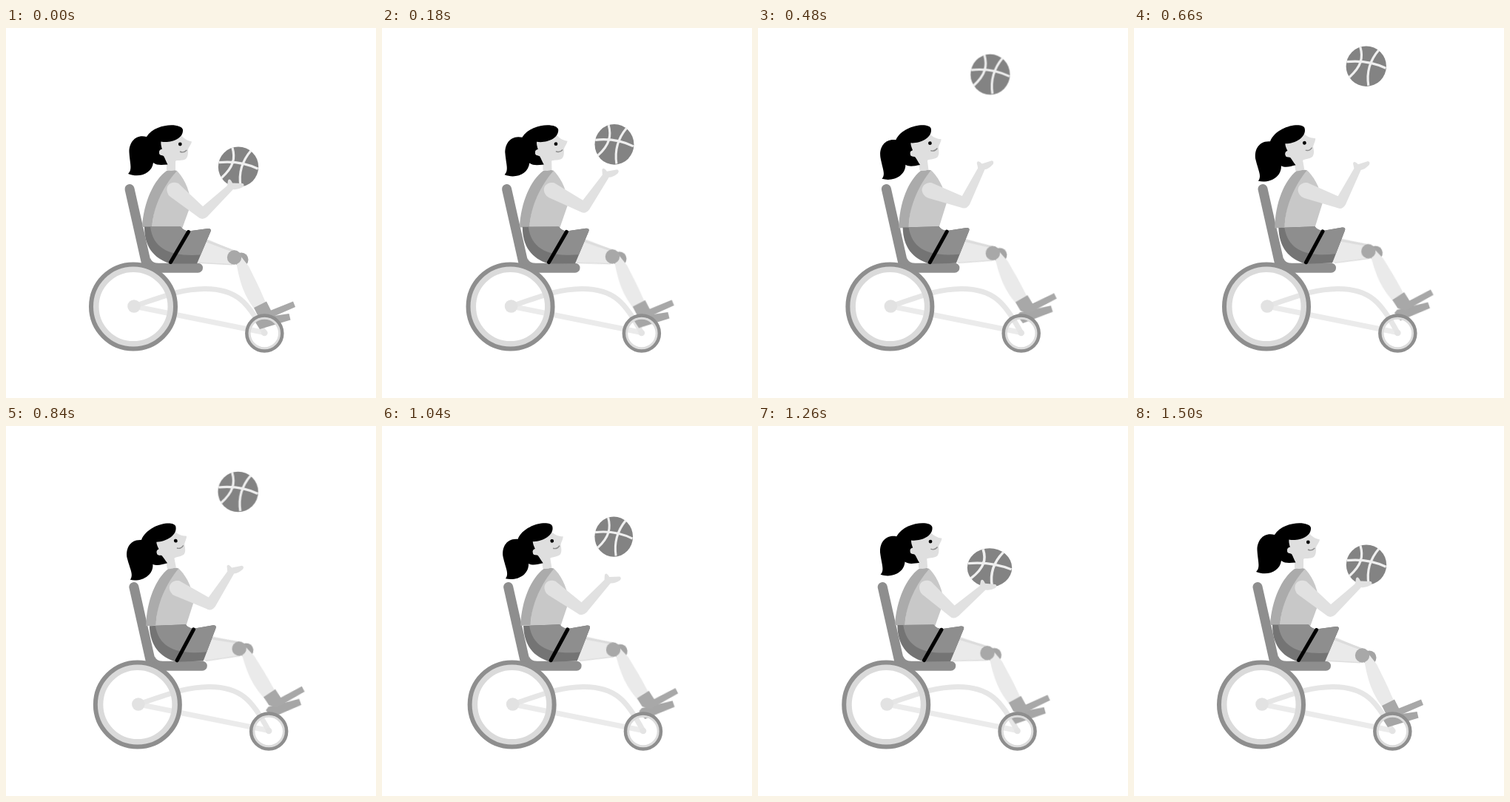
These frames come from a looping animation (500 by 500 pixels, 1.52 s). An HTML page:

```html
<!DOCTYPE html>
<html lang="en">
<head>
<meta charset="utf-8">
<title>Wheelchair basketball</title>
<style>
  html, body { margin: 0; width: 100%; height: 100%; overflow: hidden; background: #fff; }
  svg { display: block; width: 100vw; height: 100vh; }

  g[class] {
    animation-duration: 1520ms;
    animation-iteration-count: infinite;
    animation-timing-function: cubic-bezier(.333, 0, .667, 1);
  }
  .chair  { animation-name: roll; }
  .shorts { --x: 9px; --r: -2.2deg; transform-origin: 230px 285px; animation-name: slide, tilt; }
  .torso  { --x: 6.3px; --a: -2.6deg; transform-origin: 215px 269px; animation-name: slide; }
  .head   { --x: 1.8px; --r: -11deg; transform-origin: 222px 195px; animation-name: slide, tilt; }
  .thigh  { --x: 8.6px; --r: -11.5deg; transform-origin: 262px 302px; animation-name: slide, tilt; }
  .shin   { --x: 9.2px; --r: -5.5deg; --y: -9.3px; transform-origin: 310px 311px; animation-name: slide, tilt, lift; }
  .foot   { --r: -1deg; transform-origin: 344px 376px; animation-name: tilt; }
  .reach  { --x: 3.8px; animation-name: slide; }
  .arm    { transform-origin: 229px 217px; animation-name: throw; }
  .flight { animation-name: fly; }
  .ball   { animation-name: squash; }

  @keyframes roll {
    0%, 98.68%, 100% { translate: 0 0; }
    39.47% { translate: 7.1px 0; }
  }
  @keyframes slide {
    0%, 98.68%, 100% { translate: 0 0; rotate: 0deg; }
    31.58%, 39.47% { translate: var(--x) 0; rotate: var(--a, 0deg); }
  }
  @keyframes tilt {
    0%, 98.68%, 100% { rotate: 0deg; }
    53.95%, 59.21% { rotate: var(--r); }
  }
  @keyframes lift {
    0%, 98.68%, 100% { transform: translateY(0); }
    53.95%, 59.21% { transform: translateY(var(--y)); }
  }
  @keyframes throw {
    0%, 98.68%, 100% { rotate: 0deg; }
    21.05%, 39.47% { rotate: -20deg; }
    84.87% { rotate: 2.6deg; }
  }
  @keyframes fly {
    0%, 98.68%, 100% { translate: 314px 187.7px; }
    39.47% { translate: 313.8px 48.5px; }
    84.87% { translate: 313px 192.3px; }
  }
  @keyframes squash {
    0%, 39.47%, 55.26%, 98.68%, 100% { scale: 1 1; }
    22.37% { scale: .95 1.01; }
    68.42%, 75% { scale: .95 1; }
    82.89% { scale: 1.11 .965; }
  }
</style>
</head>
<body>
<svg viewBox="0 0 500 500" fill="none">
  <g class="chair">
    <g stroke-width="7" stroke-linecap="round">
      <path stroke="#ebebeb" d="M173 376 L349 411.5"/>
      <path stroke="#e6e6e6" d="M173 376 C215 362 235 353 268 352.5 C312 352 328 372 349 411.5"/>
    </g>
    <path d="M167 217.5 L191 324.2 H259.5" stroke="#8e8e8e" stroke-width="13" stroke-linecap="round" stroke-linejoin="round"/>
    <path d="M195 311 Q197.500 318 206 318 L194 320Z" fill="#8e8e8e"/>
  </g>

  <g class="shin"><circle cx="318" cy="313" r="9.5" fill="#a4a4a4"/></g>
  <g class="thigh">
    <path d="M258 288 L274 286 L308 301 V320 L258 317Z" fill="#eaeaea"/>
    <path d="M270 287.500 L310 302.500" stroke="#dcdcdc" stroke-width="3"/>
    <path d="M260 317.200 L306 319.700" stroke="#dedede" stroke-width="1.5"/>
  </g>
  <g class="shin">
    <path d="M311 316 C316 345 322 362 336 380 L352 374 C346 358 336 338 328 322 L317 308Z" fill="#eaeaea"/>
    <g class="foot">
      <path d="M340 392 L362 389 L382.500 386 L384.500 394.500 L343 407 L336 396Z" fill="#a6a6a6"/>
      <path d="M335 378 L352 369.5 L358 381.5 L388 369.5 L391 377 L352 394 L341 390Z" fill="#a8a8a8"/>
    </g>
    <circle cx="308.500" cy="310" r="9.700" fill="#a8a8a8"/>
  </g>

  <g class="torso">
    <path d="M229 194 C212 212 198 240 197.5 271 H238 L250 238 C248 215 238 200 231 193Z" fill="#c8c8c8"/>
    <path d="M217 193 Q224 190.5 231 193 C214 212 199 240 197.5 269 H184 C186 235 200 205 217 193Z" fill="#ababab"/>
  </g>
  <g class="shorts">
    <path d="M187 268.500 H236 Q240 274 247 274.500 L273 271 Q278 271 276.500 275 L258 318.500 H222 C199 311 187 295 187 268.500Z" fill="#747474"/>
    <path d="M195 268.500 H236 Q240 274 247 274.500 L273 271 Q278 271 276.500 275 L263 306.500 C224 309 199 300 195 268.500Z" fill="#8e8e8e"/>
    <path d="M246.500 275.500 L222.500 316.500" stroke="#000" stroke-width="5" stroke-linecap="round"/>
  </g>

  <g class="head">
    <path d="M209 150 L236 144 C240 149 244 152 251 153.5 C250.5 157 247 161 246 164 C246 170 246 174 243 177 C238 180 230 178 229 180 V192 Q223 194 217 192 V183 C210 178 207 168 209 150Z" fill="#dfdfdf"/>
    <path d="M239 137.500 C237 128 202 128 190 147 C174 143 166 156 166.5 168 C167.5 184 171 191 165 197 C180 203 197 197 199 182 C204 186 211 185 218.5 184.5 C216 180 215 176 213 173 L208 171 C206 168 209 163 211 164 C210 160 209 157 209.5 153.5 C222 156 240 150 239 137.500Z" fill="#000"/>
    <circle cx="211" cy="168" r="4" fill="#dfdfdf"/>
    <circle cx="235.300" cy="157" r="2.400" fill="#000"/>
    <path d="M235 167 Q240 169.500 244.300 165" stroke="#8c8c8c" stroke-width="1.400"/>
  </g>

  <g class="flight">
    <g class="ball">
      <circle r="27.200" fill="#838383"/>
      <path d="M-8 -26 C-4 -12 -6 0 -23 15 M17 -22 C5 -8 0 7 3 26 M-26.5 -6 Q2 -9 26.5 2.5" stroke="#efefef" stroke-width="3.2"/>
    </g>
  </g>

  <g class="reach">
    <g class="arm">
      <path d="M218 222 C215 212 224 206 233 210 L266 241 L299 213 L300 206 Q302.500 202 306 209.500 L320 210 Q323 212 320 215 Q313 219 307 218 L272 255 Q265 261 259 255 L222 228 Q219 226 218 222Z" fill="#e1e1e1"/>
    </g>
  </g>

  <g class="chair">
    <circle cx="172" cy="376.500" r="50.500" stroke="#dadada" stroke-width="8"/>
    <circle cx="172" cy="376.500" r="57" stroke="#8e8e8e" stroke-width="6"/>
    <circle cx="173" cy="376" r="8.800" fill="#e2e2e2"/>
    <circle cx="349.300" cy="412.500" r="20.500" stroke="#dcdcdc" stroke-width="3.500"/>
    <circle cx="349.300" cy="412.500" r="24" stroke="#8e8e8e" stroke-width="4.500"/>
    <circle cx="349.300" cy="412" r="4.300" fill="#e4e4e4"/>
  </g>
</svg>
</body>
</html>
```
